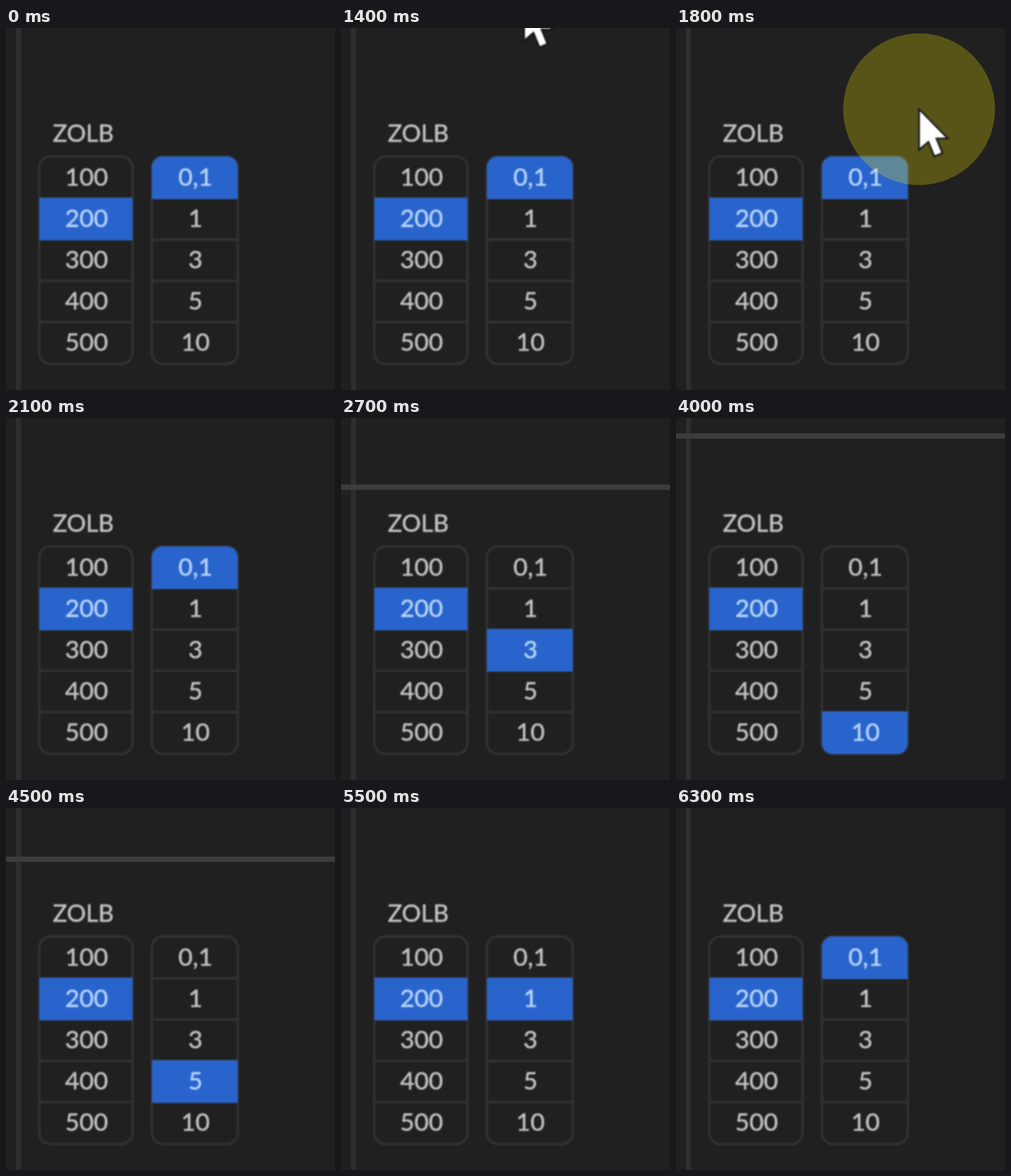
These frames come from a looping animation (494x544 px, 7.9 s). An HTML page:

```html
<!DOCTYPE html>
<html lang="en">
<head>
<meta charset="utf-8">
<style>
  html, body { margin: 0; width: 100%; height: 100%; overflow: hidden; background: #202020; }
  svg { display: block; width: 100%; height: 100%; }
  text { font: 37px Lato, "Open Sans", sans-serif; text-anchor: middle; fill: #c4c4c4; stroke: #c4c4c4; stroke-width: .6; }
  .frame { fill: none; stroke: #313131; stroke-width: 4; }
  .mark { fill: #2864cb; }
  .on { fill: #b8d4fa; stroke: #b8d4fa; }
  .soft { filter: blur(.8px); }
</style>
</head>
<body>
<svg id="stage" viewBox="0 0 494 544">
  <rect width="494" height="544" fill="#202020"/>
  <rect x="15" width="7.5" height="544" fill="#2f2f2f"/>
  <rect id="level" width="494" height="8" fill="#3c3c3c"/>
  <g id="lists" class="soft">
    <text x="116" y="171" style="font-size:36px">ZOLB</text>
  </g>
  <g id="pointer">
    <circle id="halo" r="114" fill="#fff000" fill-opacity=".25"/>
    <path class="soft" d="M0 0V61L14 49L23 71L35 66L26 44H43Z" fill="#fff" stroke="#151515" stroke-width="2.5"/>
  </g>
</svg>
<script>
const LOOP = 7900, ROW = 62, TOP = 194;
const $ = id => document.getElementById(id);

function add(parent, tag, attrs, label = "") {
  const node = document.createElementNS("http://www.w3.org/2000/svg", tag);
  for (const key in attrs) node.setAttribute(key, attrs[key]);
  node.textContent = label;
  return parent.appendChild(node);
}

// Builds a list of rows and returns a function that selects one of them.
function makeList(x, width, labels) {
  const group = add($("lists"), "g", { transform: `translate(${x} ${TOP})` });
  const height = ROW * labels.length;
  const outset = { x: -1, y: -1, width: width + 2 };
  const clip = add(group, "clipPath", { id: "clip" + x });
  add(clip, "rect", { ...outset, height: height + 2, rx: 16 });
  add(group, "rect", { ...outset, class: "frame", height: height + 2, rx: 17 });
  for (let i = 1; i < labels.length; i++)
    add(group, "path", { class: "frame", d: `M0 ${i * ROW}H${width}` });
  const clipped = add(group, "g", { "clip-path": `url(#clip${x})` });
  const mark = add(clipped, "rect", { ...outset, class: "mark", height: ROW + 2 });
  const texts = labels.map((label, i) =>
    add(group, "text", { x: width / 2 + 1, y: i * ROW + 43 }, label));
  return index => {
    mark.setAttribute("y", index * ROW - 1);
    texts.forEach((text, i) => text.classList.toggle("on", i === index));
  };
}

makeList(51, 138, [100, 200, 300, 400, 500])(1);
const selectStep = makeList(220, 127, ["0,1", 1, 3, 5, 10]);

// [start time, selected row, top of the level line or null]
const states = [
  [0, 0, null], [2700, 2, 100], [3200, 3, 100], [4000, 4, 23],
  [4500, 3, 73], [5000, 2, 73], [5500, 1, null], [6300, 0, null]
];

// Pointer tip, one position every 100 ms.
const POINTER_START = 1400;
const tips = [[275, -42], [296, -3], [317, 36], [337, 77], [365, 122], [405, 143], [462, 141]];

function draw(time) {
  const [, row, level] = states.findLast(state => state[0] <= time);
  selectStep(row);
  $("level").style.display = level === null ? "none" : "";
  $("level").setAttribute("y", level ?? 0);

  const step = Math.floor((time - POINTER_START) / 100);
  const tip = tips[step];
  $("pointer").style.display = tip ? "" : "none";
  if (tip) $("pointer").setAttribute("transform", `translate(${tip})`);
  $("halo").style.display = step >= 3 && step <= 5 ? "" : "none";
}

const start = performance.now();
function tick() {
  draw((performance.now() - start) % LOOP);
  requestAnimationFrame(tick);
}
tick();
</script>
</body>
</html>
```
